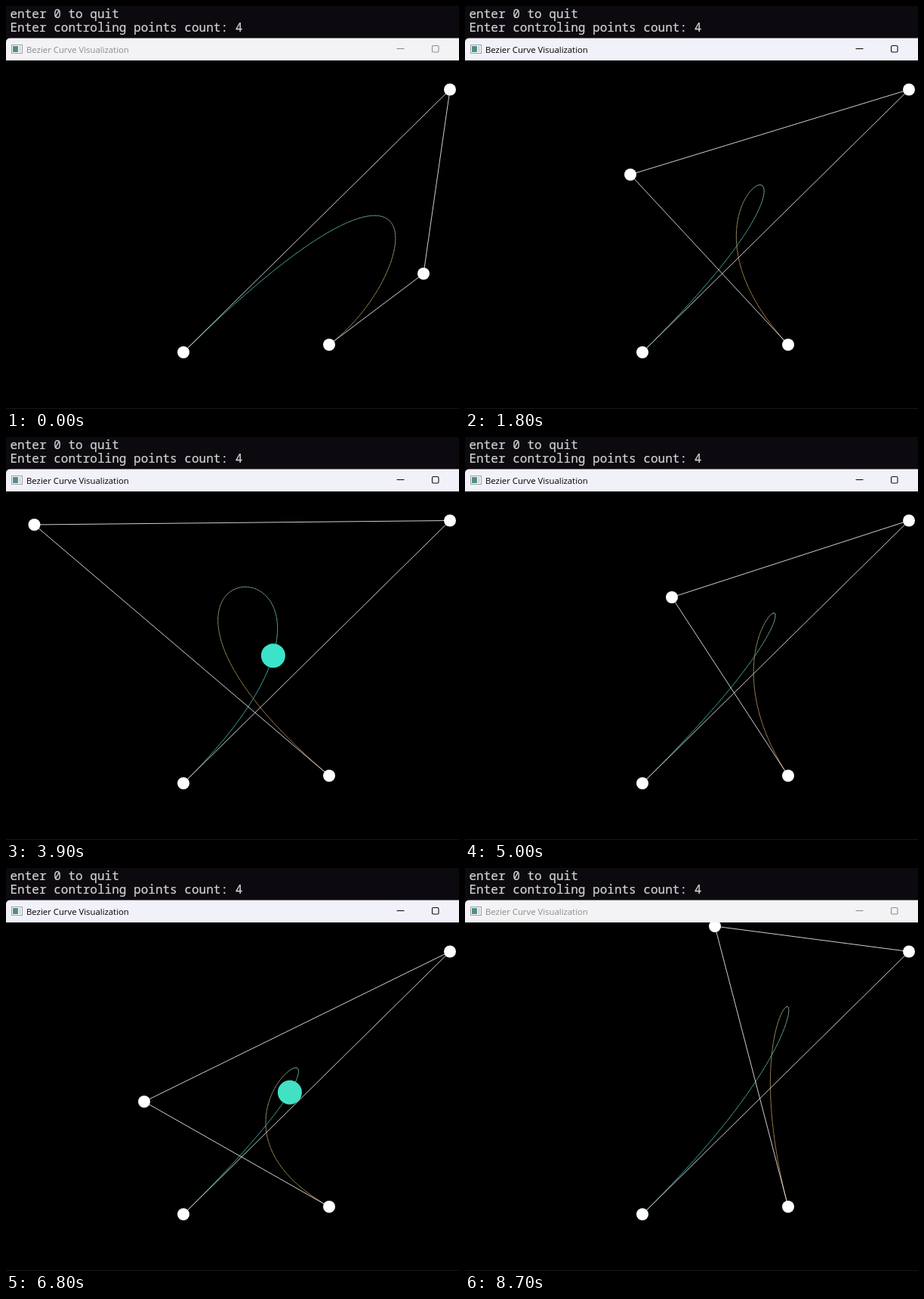
Animation, 600 px wide and 533 px high, one loop 8800 ms. Source, as an HTML page:

```html
<!DOCTYPE html>
<html lang="en">
<head>
<meta charset="utf-8">
<title>Bezier Curve Visualization</title>
<style>
  html, body { margin: 0; width: 100%; height: 100%; overflow: hidden; background: #000; }
  svg { display: block; width: 100%; height: 100%; }
  .console { font: 16.04px "Noto Sans Mono", monospace; fill: #d2d2d2; stroke: #d2d2d2; stroke-width: .2; white-space: pre; }
  .title { font: 11.35px "Open Sans", sans-serif; }
  .thin { fill: none; stroke-width: .85; stroke-linecap: round; }
</style>
</head>
<body>
<svg viewBox="0 0 600 533">
  <rect width="600" height="533" fill="#000"/>
  <g id="curve" class="thin" opacity=".85"></g>
  <circle id="ball" r="16"/>
  <path id="frame" class="thin" stroke="#f4f4f4"/>
  <g id="dots" fill="#fff"></g>
  <rect width="600" height="50" fill="#0c0a0f"/>
  <g class="console">
    <text x="5.5" y="15.5">enter 0 to quit</text>
    <text x="5.5" y="34">Enter controling points count: 4</text>
  </g>
  <path id="bar" d="M0 72V48Q0 42.5 6 42.5H600V72Z"/>
  <g>
    <rect x="7.5" y="51.5" width="14" height="11" fill="#fff" stroke="#9a9da3"/>
    <rect x="9" y="53" width="7" height="8" fill="#4f8f88"/>
    <rect x="17" y="53" width="3" height="8" fill="#d5dade"/>
  </g>
  <text id="title" class="title" x="27" y="61.5">Bezier Curve Visualization</text>
  <g id="buttons" fill="none" stroke-width="1.1">
    <path d="M517.5 56.5H527.5"/>
    <rect x="564.5" y="52.5" width="8.5" height="8.5" rx="1.5"/>
  </g>
  <rect y="532" width="600" height="1" fill="#16161a"/>
</svg>
<script>
const LOOP = 8800, STEP = 100, SEGMENTS = 64;
const $ = id => document.getElementById(id);

// Path of the dragged control point: time, x, y
const drag = [
  [0, 553, 354], [900, 553, 354], [1400, 395, 296], [1800, 219, 223],
  [2500, 37.5, 116], [4500, 37.5, 116], [5000, 274, 212], [5500, 535, 270],
  [5900, 535, 270], [6300, 365, 298], [6600, 174, 312], [6700, 183, 309],
  [6850, 183, 309], [7200, 245, 245], [7900, 331, 77], [LOOP, 331, 77]
];
const ballShown = [[300, 900], [2600, 4500], [5600, 5900], [6700, 6800]];
const focused = [300, 8400];

const within = (t, [from, to]) => t >= from && t <= to;
const mix = (a, b, k) => a + (b - a) * k;

// Cyan to orange, optionally faded towards grey
function tint(k, grey = 0) {
  const ends = [[0, 255], [255, 140], [250, 20]];
  return `rgb(${ends.map(([a, b]) => Math.round(mix(mix(a, b, k), 165, grey)))})`;
}

function add(parent, tag, attrs) {
  const el = document.createElementNS("http://www.w3.org/2000/svg", tag);
  for (const key in attrs) el.setAttribute(key, attrs[key]);
  return parent.appendChild(el);
}

function dragPoint(t) {
  const i = drag.findIndex(key => key[0] > t);
  const [a, b] = [drag[i - 1], drag[i]];
  const k = (t - a[0]) / (b[0] - a[0]);
  return [mix(a[1], b[1], k), mix(a[2], b[2], k)];
}

function bezier(p, t) {
  const s = 1 - t;
  const w = [s * s * s, 3 * s * s * t, 3 * s * t * t, t * t * t];
  return [0, 1].map(axis => w.reduce((sum, v, i) => sum + v * p[i][axis], 0));
}

const segments = Array.from({ length: SEGMENTS }, (_, i) =>
  add($("curve"), "path", { stroke: tint((i + .5) / SEGMENTS, .4) }));
const dots = Array.from({ length: 4 }, () => add($("dots"), "circle", { r: 8 }));

function place(el, [x, y]) {
  el.setAttribute("cx", x);
  el.setAttribute("cy", y);
}

function draw(t) {
  const points = [[235, 458], [588, 110.5], dragPoint(t), [428, 448]];
  points.forEach((p, i) => place(dots[i], p));
  $("frame").setAttribute("d", "M" + points.join("L"));
  segments.forEach((el, i) => el.setAttribute("d",
    `M${bezier(points, i / SEGMENTS)}L${bezier(points, (i + 1) / SEGMENTS)}`));

  // The ball runs back and forth along the curve
  const phase = (1.116 + (t - 2900) * .00068 + 4) % 2;
  const k = phase > 1 ? 2 - phase : phase;
  const ball = $("ball");
  place(ball, bezier(points, k));
  ball.setAttribute("fill", tint(k, .06));
  ball.setAttribute("visibility", ballShown.some(span => within(t, span)) ? "visible" : "hidden");

  const active = within(t, focused);
  $("bar").setAttribute("fill", active ? "#f1f1f9" : "#f3f2f5");
  $("title").setAttribute("fill", active ? "#000" : "#8c8c8e");
  $("buttons").setAttribute("stroke", active ? "#111" : "#8c8c8e");
}

const start = performance.now();
function tick() {
  const t = (performance.now() - start) % LOOP;
  draw(Math.floor(t / STEP) * STEP);
  requestAnimationFrame(tick);
}
tick();
</script>
</body>
</html>
```
